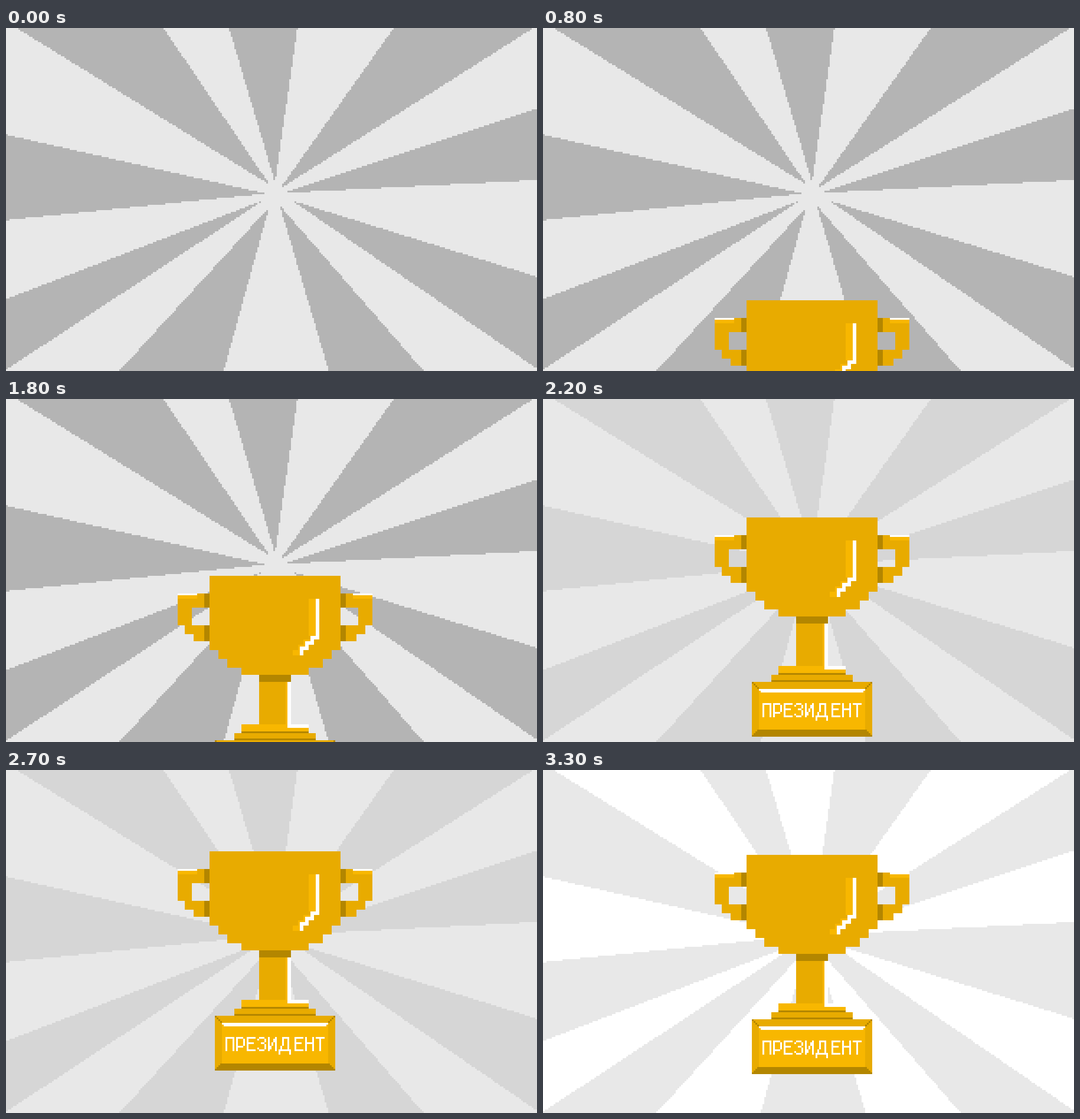
Recreate the animation shown at these times as an HTML page with a canvas. Size 900 by 582 pixels, loop 8 s.

```html
<!DOCTYPE html>
<html lang="ru">
<head>
<meta charset="utf-8">
<title>Кубок</title>
<style>
  html, body { margin: 0; width: 100%; height: 100%; overflow: hidden; background: #e8e8e8; }
  canvas { display: block; width: 100vw; height: 100vh; image-rendering: pixelated; }
</style>
</head>
<body>
<canvas id="stage" width="300" height="194" role="img" aria-label="ПРЕЗИДЕНТ"></canvas>
<script>
const W = 300, H = 194, CELL = 3, AXIS = 152, LOOP = 8000, STEP = 100;
const GOLD = '#e8ab00', LIGHT = '#f8b700', BROWN = '#b38600', WHITE = '#fff', PALE = '#e8e8e8';
const ctx = document.getElementById('stage').getContext('2d');

// Each ray: its tip, then where it starts and ends along the stage border,
// measured clockwise from the top left corner
const RAYS = [
  [447, 266, 18, 267], [456, 262, 378, 494], [464, 273, 657, 894],
  [468, 280, 1036, 1158], [485, 293, 1322, 1478], [464, 301, 1674, 1835],
  [446, 304, 2013, 2190], [437, 292, 2384, 2504], [440, 281, 2638, 2783]
];

// The cup rises slowly, then fast, overshoots and settles: step, height
const RISE = [[0, 195], [17, 108], [25, 43], [30, 50], [33, 48]];
const LAST = RISE[RISE.length - 1][0];

// Pen strokes of the letters as xy points
const GLYPHS = {
  П: '07 00 40 47',
  Р: '07 00 30 41 44 35 05',
  Е: '40 00 07 47|03 33',
  З: '01 10 30 41 42 33 23|33 44 46 37 17 06',
  И: '00 07|40 47|16 31',
  Д: '09 07 67 69|17 15 24 20 50 57',
  Н: '00 07|40 47|03 43',
  Т: '00 40|20 27'
};

function onBorder(d) {
  const w = W * CELL, h = H * CELL;
  if (d < w) return [d, 0];
  if (d < w + h) return [w, d - w];
  if (d < 2 * w + h) return [2 * w + h - d, h];
  return [0, 2 * (w + h) - d];
}

function inRay([tx, ty, from, to], x, y) {
  const side = d => {
    const [bx, by] = onBorder(d);
    return (bx - tx) * (y - ty) - (by - ty) * (x - tx);
  };
  return side(from) > 0 && side(to) < 0;
}

function buildRays() {
  const path = new Path2D();
  for (let y = 0; y < H; y++) {
    for (let x = 0; x < W; x++) {
      if (RAYS.some(r => inRay(r, (x + 0.5) * CELL, (y + 0.5) * CELL))) path.rect(x, y, 1, 1);
    }
  }
  return path;
}

function box(color, x, y, w, h) {
  ctx.fillStyle = color;
  ctx.fillRect(x, y, w, h);
}

// Same box on both sides of the axis
function pair(color, x, y, w, h) {
  box(color, x, y, w, h);
  box(color, 2 * AXIS - x - w, y, w, h);
}

// Centred boxes, one below the other
function stack(...layers) {
  let y = 0;
  for (const [color, w, h] of layers) {
    box(color, AXIS - w / 2, y, w, h);
    y += h;
  }
}

function drawHandles() {
  pair(GOLD, 97, 11, 15, 7);
  pair(GOLD, 108, 10, 4, 1);
  pair(GOLD, 97, 18, 8, 10);
  pair(GOLD, 101, 28, 11, 5);
  pair(GOLD, 106, 33, 6, 4);
  pair(WHITE, 97, 10, 11, 1);
  pair(LIGHT, 97, 11, 11, 2);
  pair(BROWN, 112, 10, 3, 8);
  pair(BROWN, 112, 28, 3, 9);
}

function drawBody() {
  stack(
    [GOLD, 74, 42], [GOLD, 64, 5], [GOLD, 54, 5], [GOLD, 38, 4],
    [BROWN, 18, 4], [GOLD, 18, 24],
    [LIGHT, 38, 4], [BROWN, 38, 1], [GOLD, 46, 3], [BROWN, 46, 1],
    [GOLD, 68, 31]
  );
  box(LIGHT, 158, 60, 1, 24);
  box(WHITE, 159, 60, 2, 24);
  box(WHITE, 159, 84, 12, 2);
}

function drawShine() {
  box(LIGHT, 171, 13, 4, 21);
  box(WHITE, 175, 13, 2, 21);
  for (let i = 0; i < 3; i++) {
    const x = 172 - 3 * i, y = 34 + 3 * i;
    box(LIGHT, x - 4, y + 2, 4, 3);
    box(WHITE, x, y, 5, 2);
    box(WHITE, x, y, 2, 5);
  }
}

function drawPlate() {
  box(LIGHT, 122, 97, 60, 23);
  for (let i = 0; i < 4; i++) {
    pair(BROWN, 118 + i, 93 + i, 1, 1);
    box(BROWN, 121 - i, 120 + i, 62 + 2 * i, 1);
  }
  box(WHITE, 122, 97, 60, 1);
  box(WHITE, 123, 98, 58, 1);
}

function line(x0, y0, x1, y1) {
  const n = Math.max(Math.abs(x1 - x0), Math.abs(y1 - y0));
  for (let i = 0; i <= n; i++) {
    box(WHITE, Math.round(x0 + (x1 - x0) * i / n), Math.round(y0 + (y1 - y0) * i / n), 1, 1);
  }
}

function drawWord(word, x, y) {
  for (const ch of word) {
    for (const stroke of GLYPHS[ch].split('|')) {
      const pts = stroke.split(' ').map(p => [x + +p[0], y + +p[1]]);
      for (let i = 1; i < pts.length; i++) line(...pts[i - 1], ...pts[i]);
    }
    x += ch === 'Д' ? 9 : 6;
  }
}

function cupTop(n) {
  const i = Math.max(1, RISE.findIndex(k => k[0] >= n));
  const [n0, y0] = RISE[i - 1], [n1, y1] = RISE[i];
  return Math.round(y0 + (y1 - y0) * (n - n0) / (n1 - n0));
}

function rayColor(n) {
  return n < 22 ? '#b4b4b4' : n < LAST ? '#d6d6d6' : WHITE;
}

const rays = buildRays();
let shown = -1;

function draw(n) {
  box(PALE, 0, 0, W, H);
  ctx.fillStyle = rayColor(n);
  ctx.fill(rays);
  ctx.save();
  ctx.translate(0, cupTop(n));
  drawHandles();
  drawBody();
  drawShine();
  drawPlate();
  drawWord('ПРЕЗИДЕНТ', 124, 105);
  ctx.restore();
}

function tick() {
  const n = Math.min(LAST, Math.floor(performance.now() % LOOP / STEP));
  if (n !== shown) draw(shown = n);
  requestAnimationFrame(tick);
}
tick();
</script>
</body>
</html>
```
